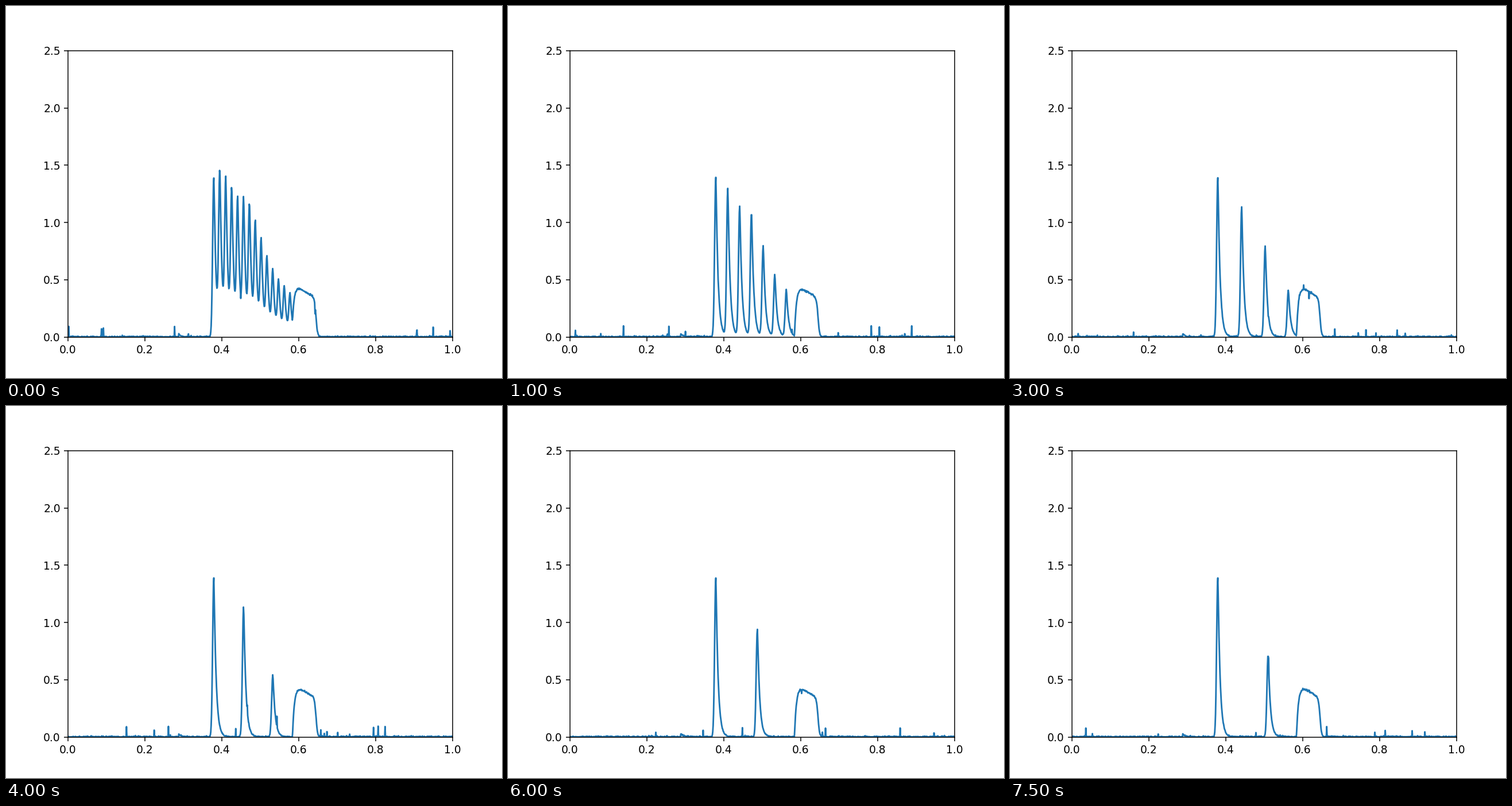
Animation of 864x648 px, one loop 8 s. Source, as a matplotlib script:

```python
import numpy as np
import matplotlib.pyplot as plt
from matplotlib.animation import FuncAnimation

FRAMES = 16
N = 1000
x = np.linspace(0, 1, N)


def pulse(slot):
    """Quick Gaussian rise, then a rounded exponential decay."""
    d = x - (0.3793 + 0.01565 * slot - 0.00003 * slot**2)
    after = np.maximum(d, 0)
    rise = np.exp(-0.5 * (d / 0.003)**2)
    fall = np.exp(-after**2 / (0.0056 * (after + 0.0006)))
    height = np.interp(slot, [0, 1, 4, 5, 6, 9, 10.5, 13],
                       [1.39, 1.37, 1.135, 1.135, 1.085, 0.645, 0.49, 0.35])
    return height * np.where(d < 0, rise, fall)


def block():
    """Wide plateau with a slightly sloping top."""
    charge = 1 - np.exp(-np.maximum(x - 0.584, 0) / 0.005)
    release = 1 / (1 + np.exp((x - 0.6453) / 0.002))
    return (0.421 - 2 * (x - 0.603)) * charge * release


def echo():
    """Faint bump ahead of the pulses."""
    return 0.025 * np.exp(-np.maximum(x - 0.288, 0) / 0.006) * (x >= 0.288)


def add_glitches(y, rng, count=20):
    spots = rng.integers(0, N, count)
    sizes = 0.1 * rng.random(count)**2
    for spot, size in zip(spots, sizes):
        down = y[spot] > 0.1 and rng.random() < 0.5
        y[spot] += -size if down else size


def signal(step):
    rng = np.random.default_rng(100 + step)
    y = block() + echo()
    y += rng.normal(0, 0.003, N) * (y > 0.3)
    for slot in np.arange(0, 14, 1 + step / 2):
        y += pulse(slot)
    y += np.abs(rng.normal(0, 0.004, N))
    add_glitches(y, rng)
    return y


fig, ax = plt.subplots(figsize=(6.4, 4.8), dpi=135)
line, = ax.plot(x, signal(0))
ax.set_xlim(0, 1)
ax.set_ylim(0, 2.5)


def update(step):
    line.set_ydata(signal(step))
    return line,


anim = FuncAnimation(fig, update, frames=FRAMES, interval=500,
                     repeat=True, repeat_delay=0)
plt.show()
```
